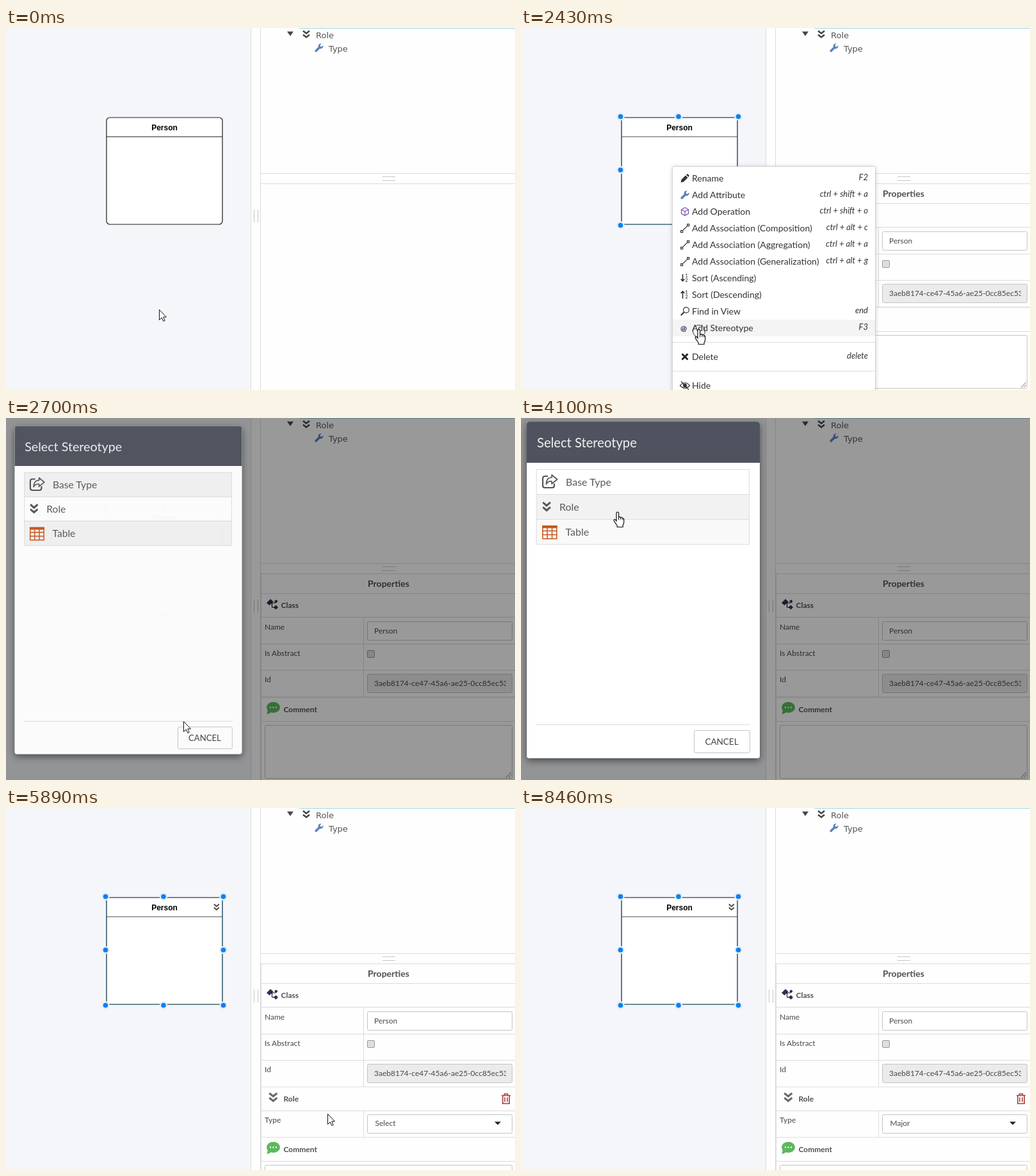
An HTML page for the animation above (8560 ms loop, 795x566 px).

```html
<!DOCTYPE html>
<html lang="en">
<head>
<meta charset="utf-8">
<title>Apply a stereotype</title>
<style>
html, body { margin: 0; width: 100%; height: 100%; overflow: hidden; background: #fff; }
svg { display: block; }
#stage { font: 12px Lato, sans-serif; }
text { fill: #484848; white-space: pre; }
.b { font-weight: bold; fill: #505050; }
.tree { font: 13px "DejaVu Sans", sans-serif; fill: #555; }
.line { fill: none; stroke: #dcdcdc; }
.field { fill: #fff; stroke: #c4c4c4; }
.ink { fill: none; stroke: currentColor; }
.fill { fill: currentColor; }
#menu text { font-size: 14px; fill: #333; }
#menu .key { font-size: 13px; font-style: italic; text-anchor: end; }
#dialog text { font-size: 16px; fill: #5a5a5a; }
</style>
</head>
<body>
<svg id="stage" width="795" height="566" viewBox="0 0 795 566">
<defs>
  <path id="chevrons" class="ink" stroke-width="2.5" d="M1 1.5L6 5.5 11 1.5M1 7.5L6 11.5 11 7.5"/>
  <g id="wrench">
    <path class="ink" stroke-width="3.6" stroke-linecap="round" d="M2.2 11.8L8 6"/>
    <path class="fill" d="M13.4 3.2L11 5.4 8.8 5 8.5 3 10.8.6A4 4 0 1 0 13.4 3.2z"/>
  </g>
  <g id="pencil"><path class="fill" d="M.5 13.5l1-4.5 6.5-6.5 3.5 3.5L5 12.5zM9 1.6l1.3-1.2q.8-.5 1.5.2l1.6 1.6q.7.7 0 1.4L12.4 5z"/></g>
  <path id="cube" class="ink" stroke-width="1.2" d="M7 .8l5.5 3v6.6L7 13.4l-5.5-3V3.8zM1.5 3.8L7 7l5.5-3.2M7 7v6.4"/>
  <path id="link" class="ink" stroke-width="1.2" d="M.6 10.6h3v3h-3zM10.6.6h3v3h-3zM3.6 10.6l7-7"/>
  <g id="down">
    <path class="ink" stroke-width="1.6" d="M3.5 1v10M.8 8.6l2.7 3 2.7-3"/>
    <text x="7.5" y="6" style="font-size:7px" class="b">1</text><text x="7.5" y="13" style="font-size:7px" class="b">2</text>
  </g>
  <g id="up">
    <path class="ink" stroke-width="1.6" d="M3.5 13V2M.8 4.6l2.7-3 2.7 3"/>
    <text x="7.5" y="6" style="font-size:7px" class="b">1</text><text x="7.5" y="13" style="font-size:7px" class="b">2</text>
  </g>
  <g id="find" class="ink"><circle cx="9" cy="5" r="4.4" stroke-width="1.2"/><path stroke-width="2" d="M5.8 8.2L.8 13.2"/></g>
  <text id="at" x="0" y="12" class="b" style="font-weight:bold;fill:#2b2b50">@</text>
  <path id="cross" class="ink" stroke-width="2.8" d="M2.5 2.5l9 9M11.5 2.5l-9 9"/>
  <g id="eye" class="ink" stroke-width="1.2"><path d="M-.5 7Q7-1.5 14.500 7 7 15.500-.5 7zM1 .5l12 13"/><circle class="fill" cx="7" cy="7" r="2.4"/></g>
  <g id="bubble">
    <ellipse cx="417.500" cy="452.500" rx="10.500" ry="8.500" fill="#5cb85c"/>
    <path fill="#5cb85c" d="M409 456l-1.500 7q4-.5 7-3.500z"/>
    <path stroke="#fff" stroke-width="2.400" stroke-linecap="round" stroke-dasharray="0 4.500" d="M413 452.500h9.200"/>
  </g>
  <filter id="soft" x="-20%" y="-20%" width="140%" height="140%"><feDropShadow dx="0" dy="4" stdDeviation="6" flood-opacity=".5"/></filter>
</defs>

<rect width="795" height="566" fill="#fefefe"/>
<rect width="382" height="566" fill="#f5f6f9"/>
<path class="line" d="M382.500 0v566M397.500 0v566M398 227.500h397M398 243.500h397"/>
<path class="line" style="stroke:#c8c8c8" d="M387.500 284v20M393.500 284v20M588 232.500h20M588 238.500h20"/>
<path stroke="#a6d8e6" d="M458 .5h337"/>
<path fill="#444" d="M439 5.500h10l-5 7z"/>
<use href="#chevrons" x="463" y="3" color="#444"/>
<text class="tree" x="484" y="16">Role</text>
<use href="#wrench" x="482" y="24" color="#5c82bf"/>
<text class="tree" x="504" y="37">Type</text>

<rect id="box" x="157" y="140" width="181" height="167" fill="#fff"/>
<path id="rule" d="M157 170h181"/>
<text x="247.500" y="160" text-anchor="middle" style="font:bold 12px 'Liberation Sans',sans-serif;fill:#000">Person</text>
<use id="badge" href="#chevrons" transform="translate(324 149) scale(.8 .88)" color="#555"/>
<g id="handles" fill="#0a80f5" stroke="#e6ebf2" stroke-width="2.400"></g>

<g id="panel">
  <text class="b" x="597.500" y="264" text-anchor="middle" style="font-size:14px">Properties</text>
  <path class="line" d="M398.500 244v322M398 274.500h397M398 311.500h397M398 353.500h397M398 394.500h397M398 436h397M558.500 312v124"/>
  <g fill="#2c2e55"><path d="M407 289l6-6 4.500 4-6 6zM419 286.500l3-2.500 2.500 2.500-2.500 3zM418 296l3.500-3.500 3.500 3.500-3.500 3.500z"/><path class="ink" stroke="#2c2e55" d="M414 289h7M415.500 289v7h4"/></g>
  <text class="b" x="429.500" y="297">Class</text>
  <text x="404" y="331">Name</text>
  <rect class="field" x="564.500" y="318.500" width="226" height="29" rx="2"/>
  <text x="575" y="337">Person</text>
  <text x="404" y="372">Is Abstract</text>
  <rect x="564.500" y="363.500" width="11" height="11" rx="1.500" fill="#dedede" stroke="#999"/>
  <text x="404" y="413">Id</text>
  <rect class="field" x="564.500" y="400.500" width="226" height="29" rx="2" style="fill:#ebebeb"/>
  <svg x="575" y="400" width="206" height="30"><text y="19">3aeb8174-ce47-45a6-ae25-0cc85ec53</text></svg>
  <g id="comment">
    <path class="line" d="M398 437h397M398 474.500h397"/>
    <use href="#bubble"/>
    <text class="b" x="433.500" y="460">Comment</text>
    <rect class="field" x="404.500" y="480.500" width="386" height="83" rx="2"/>
    <path stroke="#777" d="M781 562l8-8M785 562l4-4"/>
  </g>
  <g id="role">
    <use href="#chevrons" transform="translate(410 444) scale(1.220)" color="#66666c"/>
    <text class="b" x="433.500" y="459">Role</text>
    <g fill="none" stroke="#b23a3a" stroke-width="1.600"><path d="M774 449.500h14M778.500 449v-2h5v2M775.800 450v12.200h10.400V450M779 452.500v7M783 452.500v7"/></g>
    <path class="line" d="M398 473.500h397M558.500 474v41"/>
    <text x="404" y="492">Type</text>
    <rect id="glow" x="563" y="478" width="229" height="32" rx="4" fill="none" stroke="#d5e9f2" stroke-width="3"/>
    <rect id="select" class="field" x="564.500" y="479.500" width="226" height="29" rx="2"/>
    <text id="value" x="576.500" y="497"></text>
    <path fill="#222" d="M763 490.500h10l-5 5z"/>
    <g id="options">
      <rect x="564.500" y="508.500" width="226" height="90" fill="#fff" stroke="#96c8da"/>
      <rect id="hot" x="565" y="509" width="225" height="32" fill="#f2f2f2"/>
      <text x="576.500" y="529">Major</text><text x="576.500" y="561">Minor</text>
    </g>
  </g>
</g>

<rect id="shade" width="795" height="566"/>
<g id="dialog">
  <rect x="9" y="6" width="364" height="526" rx="4" fill="#fff" filter="url(#soft)"/>
  <path fill="#4f535f" d="M9 70V10q0-4 4-4h356q4 0 4 4v60z"/>
  <text x="25" y="46" style="font-size:20.200px;fill:#f0f0f0">Select Stereotype</text>
  <g id="rows" stroke="#ddd"></g>
  <g class="ink" color="#555" stroke-width="2.200"><path d="M42 91h-4.500q-3.500 0-3.500 3.500v11q0 3.500 3.500 3.500h11q3.500 0 3.500-3.500v-3"/><path stroke-width="1.700" stroke-linejoin="round" d="M48 89l8.500 7-8.500 7v-4q-6-.5-8.500 4.500 0-10.500 8.500-10.500z"/></g>
  <text x="70" y="106">Base Type</text>
  <use href="#chevrons" transform="translate(33 130) scale(1.170 1.250)" color="#555"/>
  <text x="60" y="145">Role</text>
  <g fill="none" stroke="#c9571c" stroke-width="1.500"><path d="M33.800 168.800h22v20h-22zM34 176.500h22M34 182.500h22M41 172v17M48.500 172v17"/><path stroke-width="3.500" d="M33 170.500h23.500"/></g>
  <text x="69.500" y="184">Table</text>
  <path class="line" d="M24 479.500h334"/>
  <rect class="field" x="270.500" y="488.500" width="87" height="35" rx="2"/>
  <text x="313.500" y="511" text-anchor="middle" style="font-size:13.500px;fill:#444">CANCEL</text>
</g>

<g id="menu">
  <rect x="236.500" y="216.500" width="317" height="380" rx="3" fill="#fff" stroke="#d4d4d4" style="filter:drop-shadow(0 1px 3px #0003)"/>
  <rect id="lit" x="237" width="316" height="26" fill="#f4f4f4"/>
  <path class="line" d="M237 491.500h316M237 536.500h316"/>
  <g id="items"></g>
  <circle id="ring" cx="278" cy="474" r="9.500" fill="none" stroke="#333"/>
</g>

<g id="cursor" fill="#fff" stroke="#111" stroke-linejoin="round">
  <path id="arrow" d="M.5.5V16.500l3.700-3.500 2.600 5.500 2.400-1.100-2.500-5.400h4.800z"/>
  <g id="hand">
    <path stroke-width="1.200" d="M-2 15V1.900a1.800 1.800 0 0 1 3.600 0V8.500q.3-1 1.700-.9t1.600 1.600q.4-.9 1.600-.7t1.300 1.500q1.900-.4 1.900 1.800V16q0 2.500-1.600 4.500v3H-.8V21Q-4 17-5.600 14q-.7-2 .6-2.300T-2 14"/>
    <path d="M1.600 8.500v4M4.900 9.200v3M7.800 10v2.500"/>
  </g>
</g>
</svg>
<script>
const $ = id => document.getElementById(id);
const set = (id, attrs) => { for (const k in attrs) $(id).setAttribute(k, attrs[k]); };
const show = (id, on) => { $(id).style.display = on ? '' : 'none'; };

const LOOP = 8560;

// label, shortcut, icon, icon colour
const items = [
  ['Rename', 'F2', 'pencil', '#333'],
  ['Add Attribute', 'ctrl + shift + a', 'wrench', '#5c82bf'],
  ['Add Operation', 'ctrl + shift + o', 'cube', '#7b52ab'],
  ['Add Association (Composition)', 'ctrl + alt + c', 'link', '#333'],
  ['Add Association (Aggregation)', 'ctrl + alt + a', 'link', '#333'],
  ['Add Association (Generalization)', 'ctrl + alt + g', 'link', '#333'],
  ['Sort (Ascending)', '', 'down', '#333'],
  ['Sort (Descending)', '', 'up', '#333'],
  ['Find in View', 'end', 'find', '#333'],
  ['Add Stereotype', 'F3', 'at', '#2b2b50'],
  ['Delete', 'delete', 'cross', '#222'],
  ['Hide', '', 'eye', '#333']
];
$('items').innerHTML = items.map(([label, key, icon, color], i) => {
  const y = 235 + 26 * i + (i > 9 ? 19 * (i - 9) : 0);
  return `<use href="#${icon}" x="249" y="${y - 7}" color="${color}"/>
    <text x="267" y="${y + 5}">${label}</text><text class="key" x="542" y="${y + 3}">${key}</text>`;
}).join('');

for (const y of [138.5, 222, 308.5])
  for (const x of [155.5, 246, 339.5])
    if (x !== 246 || y !== 222) $('handles').innerHTML += `<circle cx="${x}" cy="${y}" r="5"/>`;

$('rows').innerHTML = [0, 1, 2].map(i => `<rect x="24.5" y="${80.5 + 39 * i}" width="332" height="39"/>`).join('');

// Pointer moves: start, end, number of steps, path
const moves = [
  [400, 940, 5, [[239, 440], [236, 216]]],
  [1870, 2430, 5, [[236, 216], [278, 471]]],
  [2550, 2550, 1, [[278, 471], [277, 474]]],
  [2850, 3670, 7, [[277, 474], [151, 147]]],
  [4370, 4370, 1, [[151, 147], [148, 148]]],
  [5080, 6050, 8, [[148, 148], [150, 160], [187, 262], [297, 456], [440, 495], [590, 505], [680, 514], [502, 478], [620, 490]]],
  [6730, 7050, 3, [[620, 490], [632, 531]]],
  [7600, 7750, 2, [[632, 531], [642, 547], [644, 580]]]
];

function pointer(t) {
  const [start, end, n, path] = moves.findLast(m => t >= m[0]) || [0, 1, 1, moves[0][3].slice(0, 1)];
  const step = end > start ? Math.floor((t - start) / (end - start) * (n - 1) + 0.2) + 1 : n;
  let p = Math.min(1, step / n);
  if (path.length === 2) p = p * p * (3 - 2 * p);
  const last = path.length - 1, f = p * last, i = Math.min(Math.floor(f + 1e-6), last);
  const a = path[i], b = path[Math.min(i + 1, last)];
  return [0, 1].map(k => a[k] + (b[k] - a[k]) * (f - i));
}

// time, dialog scale, dialog opacity, backdrop opacity
const fades = [
  [0, 1, 0, 0], [2550, .75, .45, .2], [2700, .975, .97, .4],
  [2850, 1, 1, .4], [4220, .646, .34, 0], [4370, 1, 0, 0]
];

function draw(t) {
  const within = (a, b) => t >= a && t < b;
  const [x, y] = pointer(t);
  const selected = t >= 1080, typed = t >= 4640;
  const menu = within(1740, 2550), open = within(6300, 7190), focus = within(6300, 8460);

  set('box', { rx: selected ? 1 : 5, stroke: selected ? '#42657a' : '#1c1c1c', 'stroke-width': selected ? 1.7 : 1.2 });
  set('rule', { stroke: selected ? '#4c4c52' : '#1c1c1c', 'stroke-width': 1.2 });
  show('handles', selected);
  show('badge', typed);

  show('panel', t >= 1210);
  show('role', typed);
  set('comment', { transform: `translate(0 ${typed ? 78 : 0})` });
  show('glow', focus);
  $('select').style.stroke = focus ? '#96c8da' : '';
  $('value').textContent = t >= 7190 ? 'Major' : 'Select';
  show('options', open);
  show('hot', y > 508);

  const [, scale, alpha, shade] = fades.findLast(f => t >= f[0]);
  set('shade', { opacity: shade });
  show('dialog', alpha);
  set('dialog', { opacity: alpha, transform: `translate(191 269) scale(${scale}) translate(-191 -269)` });
  const hover = Math.floor((y - 80) / 39);
  const rowFills = t < 2850 ? ['#f2f2f2', '#fff', '#f2f2f2'] : ['#fff', '#fff', '#f9f9f9'];
  [...$('rows').children].forEach((row, i) => row.setAttribute('fill', t >= 2850 && i === hover ? '#f2f2f2' : rowFills[i]));

  show('menu', menu);
  set('lit', { y: 222 + 26 * Math.max(0, Math.floor((y - 222) / 26)) });
  show('ring', t >= 2430);

  const hand = within(1870, 2550) || within(2850, 4370) && hover >= 0 && hover < 3 || within(6050, 7190);
  show('hand', hand);
  show('arrow', !hand);
  set('cursor', { transform: `translate(${Math.round(x)} ${Math.round(y)})` });
}

function tick() {
  draw(performance.now() % LOOP);
  requestAnimationFrame(tick);
}
tick();
</script>
</body>
</html>
```
